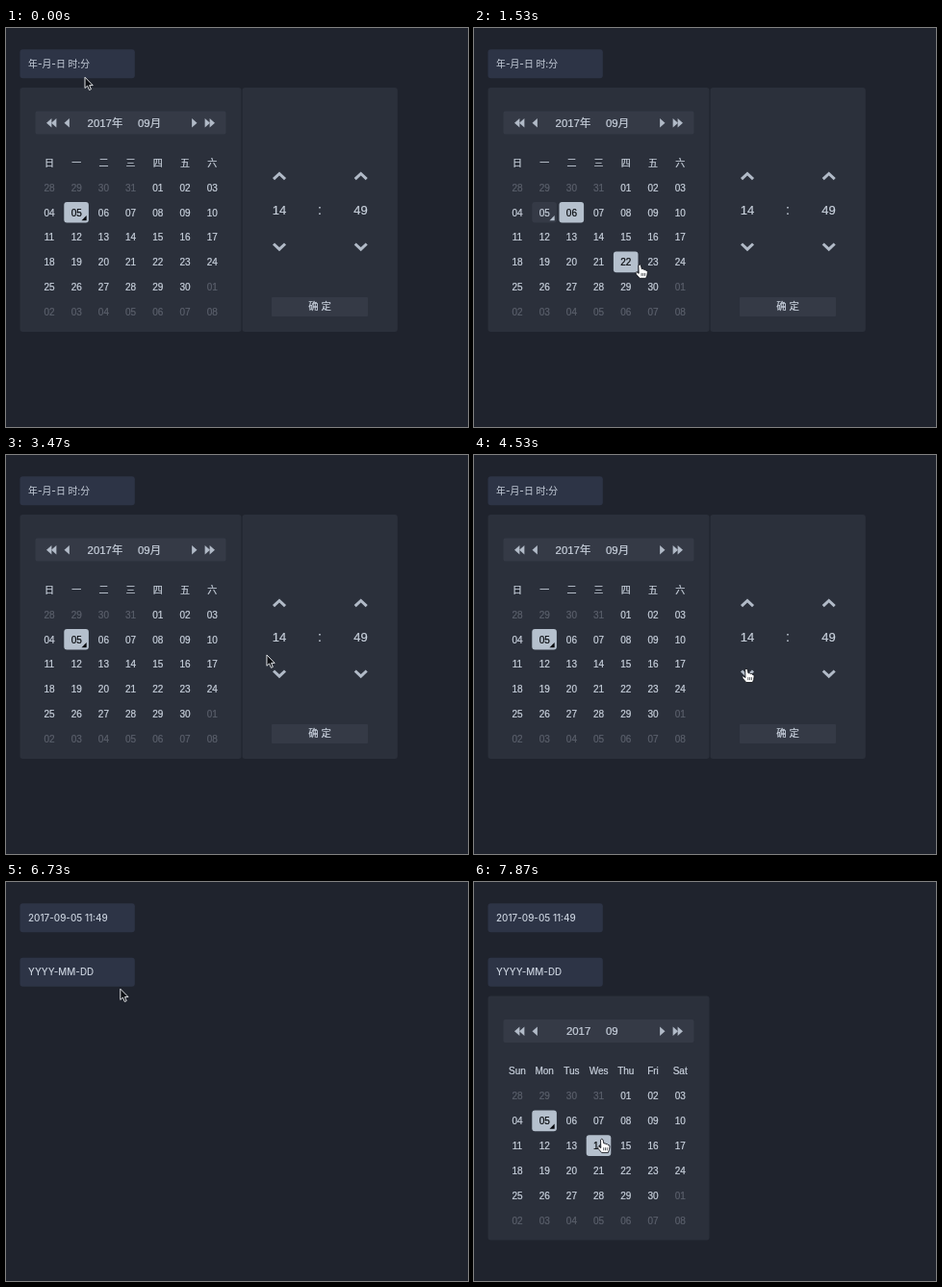
An HTML page for the animation above (8 s loop, 480 px wide and 415 px high).

```html
<!DOCTYPE html>
<html lang="zh">
<head>
<meta charset="utf-8">
<title>Date picker</title>
<style>
html, body { margin: 0; width: 100%; height: 100%; overflow: hidden; background: #1f232d; }
svg { display: block; width: 100vw; height: 100vh; }
text { font-family: 'Liberation Sans', 'Noto Sans CJK SC', 'Noto Sans CJK', sans-serif; white-space: pre; stroke-width: .22px; }
.ui { font-family: Inter, 'Noto Sans CJK SC', 'Noto Sans CJK', sans-serif; font-weight: 500; stroke-width: 0; }
</style>
</head>
<body>
<svg id="stage" viewBox="0 0 480 415"></svg>
<script>
const LOOP = 8000, STEP = 200 / 3;
const INK = '#c8d0dc', ICON = '#b1bac7', LIT = '#b5c0cd', DIM = '#5a5f6b', BAR = '#353a46', DARK = '#080a0e';
const stage = document.getElementById('stage');

// Cursor moves: first step, last step, goal
const moves = [
  [0, 7, 127, 188], [7, 10, 104, 186], [15, 27, 175, 248], [35, 42, 78, 192],
  [49, 53, 274, 208], [53, 57, 292, 219], [65, 69, 283, 222], [81, 90, 327, 286],
  [93, 107, 101, 96], [107, 118, 133, 267]
];
const easeOut = f => 1 - (1 - f) ** 3;

function cursorAt(k) {
  let x = 82, y = 51;
  for (const [from, to, goalX, goalY] of moves) {
    const f = easeOut(Math.min(1, Math.max(0, (k - from) / (to - from))));
    x += (goalX - x) * f;
    y += (goalY - y) * f;
  }
  return [x, y];
}

const rect = (x, y, w, h, fill, r = 0) =>
  `<rect x="${x}" y="${y}" width="${w}" height="${h}" rx="${r}" fill="${fill}"/>`;
const text = (s, x, y, size, fill = INK, anchor = 'middle', cls = '') =>
  `<text x="${x}" y="${y}" font-size="${size}" fill="${fill}" stroke="${fill}" text-anchor="${anchor}" class="${cls}">${s}</text>`;
const tri = (x, dir) => `<path d="M${x} 98.7l${5.4 * dir}-4.8v9.6z" fill="${ICON}"/>`;
const chevron = (x, y, dir) =>
  `<path d="M${x - 6} ${y + 2.8 * dir}l6 ${-5.6 * dir} 6 ${5.6 * dir}" fill="none" stroke="${ICON}" stroke-width="3"/>`;
const inside = ([x, y], l, t, w, h) => x >= l && x <= l + w && y >= t && y <= t + h;
const panel = (x, w) => rect(x, 62, w, 254, '#2b303b', 3);
const field = (s, y) =>
  rect(14.5, y, 119.3, 30, '#2d3446', 3) + text(s, 23, y + 18.4, 9.9, INK, 'start', 'ui');

const cellX = i => 45 + 28.2 * (i % 7);
const cellY = i => 166.3 + 25.83 * Math.floor(i / 7);
const dayOf = i => i < 4 ? 28 + i : i < 34 ? i - 3 : i - 33;
const enabled = i => i > 3 && i < 34;

function hoveredDay(p, dy) {
  for (let i = 4; i < 34; i++) {
    if (inside(p, cellX(i) - 12.5, cellY(i) - 10.7 + dy, 25, 21)) return dayOf(i);
  }
  return 0;
}

function calendar(dy, chinese, selected, hover) {
  const week = chinese ? [...'日一二三四五六'] : ['Sun', 'Mon', 'Tus', 'Wes', 'Thu', 'Fri', 'Sat'];
  let s = panel(14.5, 230) + rect(30.5, 86.5, 198, 24, BAR, 2);
  for (const x of [42, 47, 60.5]) s += tri(x, 1) + tri(259 - x, -1);
  s += text(chinese ? '2017年' : '2017', 121.3, 102.5, 11.4, INK, 'end');
  s += text(chinese ? '09月' : '09', 137, 102.5, 11.4, INK, 'start');
  week.forEach((w, i) => s += text(w, cellX(i), 143.8, 10));
  for (let i = 0; i < 42; i++) {
    const d = dayOf(i), x = cellX(i), y = cellY(i), today = i === 8;
    const lit = enabled(i) && (d === selected || d === hover);
    if (lit || today) s += rect(x - 12.9, y - 11.2, 25.6, 21.6, lit ? LIT : BAR, 3);
    if (today) s += `<path d="M${x + 10.5} ${y + 2.8}v5.2h-5.2z" fill="${lit ? DARK : LIT}"/>`;
    s += text(String(d).padStart(2, '0'), x, y + 3.5, 10, lit ? DARK : enabled(i) ? INK : DIM);
  }
  return `<g transform="translate(0 ${dy})">${s}</g>`;
}

function clock(hour, onButton) {
  let s = panel(245.5, 161.3);
  for (const x of [284, 368.7]) s += chevron(x, 154.3, 1) + chevron(x, 227.3, -1);
  s += text(hour, 284, 193.7, 13) + text(':', 326, 193.5, 14) + text(49, 368.5, 193.7, 13);
  s += rect(276, 280, 100, 20, onButton ? LIT : BAR, 1);
  return s + text('确 定', 326, 293.4, 10.4, onButton ? DARK : INK);
}

function pointer([x, y], hand) {
  const shape = hand
    ? '<path d="M-1.5 1.2Q-.2-.8 1.1 1.2L1.9 5Q3.3 4.2 4 5.6 5.6 5 6.2 6.5 8 6.2 8 8L7.5 11.5 6.3 14.6H-.3L-3.8 10.5Q-5.2 8.3-3.4 8L-1.2 9.6Z" fill="#fff" stroke="#14171d" stroke-width=".9"/>' +
      '<path d="M1.7 9.2v3M3.5 9.2v3M5.3 9.2v3" stroke="#14171d" stroke-width=".7"/>'
    : '<path d="M0 .2V11.5L2.6 9.2 4.5 13.5 6.4 12.7 4.7 8.6H8.2Z" fill="#0c0e13" stroke="#f4f6f9" stroke-width=".9"/>';
  return `<g transform="translate(${x} ${y})">${shape}</g>`;
}

function draw(k) {
  const pos = cursorAt(k), at = cursorAt(k - 1); // hover trails the cursor by a step
  const first = k < 94, second = k >= 107;
  const selected = k < 15 ? 5 : k < 30 ? 6 : k < 46 ? 23 : 5;
  const hour = k < 74 ? 14 : k < 76 ? 13 : k < 79 ? 12 : 11;
  const dy = first ? 0 : 56.6;
  const hover = first || second ? hoveredDay(at, dy) : 0;
  const onButton = first && inside(at, 276, 280, 100, 20);
  const onChevron = first && inside(at, 276, 216, 17, 20);

  let s = rect(0, 0, 480, 415, '#1f232d');
  s += field(first ? '年-月-日 时:分' : '2017-09-05 11:49', 22.3);
  if (first) s += calendar(0, true, selected, hover) + clock(hour, onButton);
  else s += field('YYYY-MM-DD', 78.8);
  if (second) s += calendar(dy, false, selected, hover);
  stage.innerHTML = s + pointer(pos, hover || onButton || onChevron);
}

let shown = -1;
const start = performance.now();
function tick() {
  const t = (performance.now() - start) % LOOP;
  const k = Math.min(119, Math.floor((t + 4) / STEP));
  if (k !== shown) draw(shown = k);
  requestAnimationFrame(tick);
}
tick();
</script>
</body>
</html>
```
